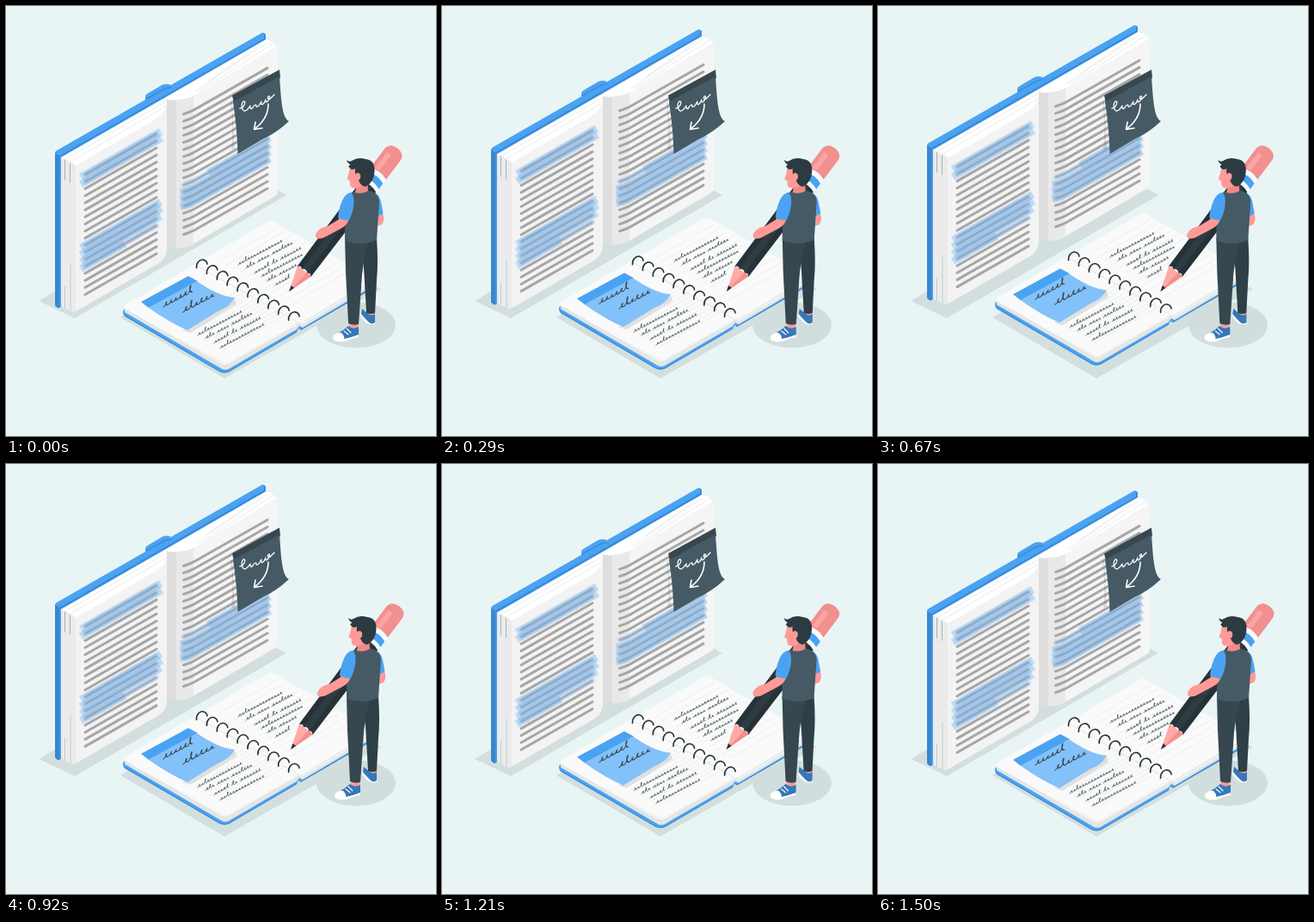
An HTML page that plays this animation: 500x500 px, repeating every 1540 ms.

```html
<!DOCTYPE html>
<html lang="en">
<head>
<meta charset="utf-8">
<title>Taking notes</title>
<style>
html, body { margin: 0; height: 100%; overflow: hidden; background: #e9f5f5; }
svg { display: block; width: 100%; height: 100%; }
path { stroke-linecap: round; stroke-linejoin: round; }
</style>
</head>
<body>
<svg id="stage" viewBox="0 0 500 500"></svg>
<script>
const SLOPE = 0.572;
const BLUE = '#4aa3f2', DEEP = '#3a86cf', DARK = '#263238', SLATE = '#455a64', SKIN = '#ff9a97';

const shape = (d, fill, extra = '') => `<path d="${d}" fill="${fill}" ${extra}/>`;
const stroke = (d, color, width, extra = '') =>
  `<path d="${d}" fill="none" stroke="${color}" stroke-width="${width}" ${extra}/>`;
const range = (n, f) => Array.from({ length: n }, (_, i) => f(i)).join('');
const slant = (x, y, dx) => `M${x} ${y}l${dx} ${-dx * SLOPE}`;

// Printed line, blurred under a marker stroke when highlighted
function printed(d, marker) {
  if (!marker) return stroke(d, '#a6a6a6', 3);
  return stroke(marker, '#4aa3f2', 8.8, 'stroke-opacity=".3" style="stroke-linecap:butt"') +
    `<g style="filter:blur(.9px)">${stroke(d, '#7f9fc2', 3.2)}</g>`;
}

// Cursive scribble rising along the page; words are lengths in letters
function scribble(x, y, words, seed, scale = 1) {
  let d = '', at = 0;
  const random = () => (seed = (seed * 16807) % 2147483647) / 2147483647;
  for (const letters of words) {
    d += `M${at} 0`;
    for (let i = 0; i < letters; i++) {
      const h = random() > 0.85 ? 5 : 1.6 + random() * 1.2;
      d += `c1.4 0 2.800 ${-h} 2.200 ${-h}s-1 ${h} 1.2 ${h}`;
      at += 3.4;
    }
    at += 3.2;
  }
  return `<g transform="translate(${x} ${y}) skewY(-28) scale(${scale})">${stroke(d, '#37474f', 0.7)}</g>`;
}

function book() {
  const left = range(18, i => {
    const y = 196 + 8.2 * i, lit = i < 2 || (i > 9 && i < 14);
    const mark = slant(87, y + 3, i === 13 ? 51 : 93 + i % 2);
    return printed(slant(92, y, 83), lit && mark);
  });
  const right = range(18, i => {
    const y = 72 + 8.24 * i, lit = i > 9 && i < 14;
    const d = `M304 ${y}L218 ${y + 49}q-5 2.500 -11.500 4.500`;
    const mark = i === 10 ? `M307 ${y - 1.5}L235 ${y + 39.5}`
      : `M307 ${y - 1.5}L218 ${y + 49}q-6 3 -15.500 5`;
    return printed(d, lit && mark);
  });
  return shape('M57 171Q57 169 59 168L298 31Q302 31 302 35V200L64 338V350L60 351L57 348Z', BLUE) +
    shape('M162 109V105Q162 103 165 101.500L182 91.500Q187 89.500 192 92L193 95L165 111Z', BLUE) +
    stroke('M163 108L183 97Q188 94 192 95', DEEP, 1.2) +
    shape('M57 171L62.500 174.500V351H60L57 348Z', DEEP) +
    stroke('M63 174.500L301 38V33', DEEP, 1.6) +
    // page block
    shape('M64 176L192 102.500L302 39L309 41L316 48L218 140L187 200L82 190V354L78 356L66 350L64 346Z', '#fff') +
    shape('M64 177L69 178L76 182L82 186V354L78 356L66 350L64 346Z', '#ebebeb') +
    stroke('M68.500 179V202M74.500 183V205', '#8d9699', 0.7) +
    stroke('M68.500 326V351M75 300V354', '#b5bbbd', 0.7) +
    stroke('M69 178L186 111M75 181L187 116M220 99L303 43M236 87L296 45M225 99L310 44', '#dfe3e5', 0.7) +
    // left page
    shape('M81 187Q81 185.500 83 184.500L175 131Q187 124 187 112V282Q187 293 178 299L84 353.500Q81 355 81 352Z', '#f3f3f3') +
    // gutter and right page
    shape('M187 108Q193 111 204 108V281Q196 284 187 279Z', '#dedede') +
    shape('M198 109Q210 109 219 104L314 47Q316 46 316 49V216Q316 219 313 221L219 276Q210 282 198 281Z', '#f5f5f5') +
    shape('M198 109Q210 109 218 104V277Q209 282 198 281Z', '#e9e9e9') +
    left + right;
}

function darkNote() {
  return shape('M263 112L266 166L262 168Q265 140 261 112Z', '#000', 'opacity=".1"') +
    shape('M263 104L318 74L319 84L265 113Z', '#37474f') +
    shape('M264 111.500L318 82C320 110 321 130 329 134Q314 148 298 155L269.500 172Q269 145 264 111.500Z', SLATE) +
    stroke('M272 119C277 118 280 110 276 111C273 113 274 123 278 122Q281 121 284 116Q284 122 287 118Q289 114 291 115Q290 119 294 116L297 111Q296 117 300 113L302 109Q301 114 305 110Q308 104 305 105Q303 109 307 108L312 103', '#fff', 1.3) +
    stroke('M305 114Q305 131 289 143M290 135L288.500 143.500L298 142', '#fff', 1.6);
}

function notebook() {
  const rules = range(12, i =>
    stroke(slant(200 + 4.7 * i, 371 + 2.7 * i, 76), '#e3e6e7', 0.6) +
    stroke(slant(249 + 7.7 * i, 296 + 4.5 * i, 68), '#e3e6e7', 0.6));
  const rings = range(10, i =>
    stroke(`M${221.5 + 11.9 * i} ${304.5 + 6.75 * i}c-.5 -6 4 -10.500 8 -9.500q4 1 4.500 5`, DARK, 1.6));
  return shape('M136 357Q135 354 139 352L308 254L427 321Q429 324 427 328L343 377L340 375L338 379L260 425Q254 428 248 425L138 361Z', BLUE) +
    stroke('M137 359L249 425Q254 427 259 425L338 379M343 376L425 329', DEEP, 1) +
    shape('M138 350V356L251 422Q255 424 259 422L338 376L341 372L345 374L426 326V315Z', '#e4e6e6') +
    shape('M139 352Q136 350 140 347L304 251Q308 248 312 251L425 316L424 320L344 368L338 369L259 414Q255 416 251 414Z', '#fafafa') +
    stroke('M222 302L340 368', '#e4e6e6', 1) +
    stroke('M140 352L251 415.500Q255 417 259 415L338 370M344 370L424 323', '#fff', 1) +
    rules +
    shape('M205 377L214 380L268 347L266 340Z', '#000', 'opacity=".1"') +
    shape('M157 344L212 314L223 320L166 351Z', BLUE) +
    shape('M166 351L222 320Q248 338 266 339Q260 350 246 355L211 377Q190 368 166 351Z', '#82c1f9') +
    scribble(183, 350, [6], 5, 1.65) + scribble(206, 356, [6], 21, 1.75) +
    scribble(223, 383, [15], 11) + scribble(232, 387, [3, 4, 7], 29) +
    scribble(242, 392, [5, 2, 7], 47) + scribble(249, 398, [15], 11) +
    scribble(270, 301, [15], 11) + scribble(279, 305, [3, 4, 7], 29) +
    scribble(289, 311, [5, 2, 7], 47) + scribble(297, 315, [14], 11) +
    scribble(304, 320, [3, 6], 29) + scribble(313, 325, [5], 47) +
    rings;
}

function pencil() {
  return `<g transform="translate(329 332) rotate(-52.9)">` +
    shape('M0 0L30 -10V10Z', '#ffaaa5') + shape('M0 0L30 3V10Z', '#f58f8c') +
    shape('M0 0L7 -2.300V2.300Z', DARK) +
    shape('M29 -10Q33 -7 30 -4Q34 0 30 4Q33 7 29 10L156 11V-11Z', DARK) +
    shape('M30 -4Q34 0 30 4L155 4V-4Z', '#2f3c42') +
    shape('M153 -11.500Q158 0 153 11.500H173Q178 0 173 -11.500Z', '#f5fafc') +
    shape('M158 -11.500Q163 0 158 11.500H166Q171 0 166 -11.500Z', BLUE) +
    shape('M172 -11.500H201Q209 -10 209 0T201 11.500H172Q177 0 172 -11.500Z', '#f28f8f') +
    shape('M175 -7H198V-1H176Z', '#f9a6a2') + '</g>';
}

function writer() {
  const shoe = (d, toe) => shape(d, '#3577b8') + shape(toe, '#fff');
  return pencil() +
    shape('M431 240L438 241Q441 249 437 254L429 257Z', SKIN) +
    shape('M428 217Q434 219 436 228L438.500 241Q435 245 430 244Z', BLUE) +
    // feet
    shape('M420 354H429V362L420 361Z', SKIN) +
    shoe('M414 352L421 358Q426 361 429 358V368Q426 371 422 368L413 358Z', 'M412 357Q414 363 422 368Q426 371 429 368V370Q424 371 420 369Q411 362 412 357Z') +
    shape('M399 366H409V378L399 377Z', SKIN) +
    shoe('M385 381Q393 377 398 372Q403 377 410 373V384Q401 385 395 389L384 388Z', 'M381 383Q385 379 390 380Q394 384 393 387Q400 386 410 382V385Q402 386 397 389Q388 392 382 389Q379 387 381 383Z') +
    stroke('M393 378L398 382M396 375L401 380', '#fff', 1.1) +
    // trousers and shirt
    shape('M412 272L431 270Q433 300 431 318L429 357Q424 359 419 357L416 305Z', '#2f3f47') +
    shape('M394 270L422 273Q416 292 414 312L410 370Q404 372 398 369L395 310Z', '#37474f') +
    shape('M397 219Q406 214 419 214Q433 216 434 227L431 272Q413 280 394 273V248Z', SLATE) +
    // near arm
    shape('M387 243L399 247Q397 255 389 259L374 267Q366 272 361 270Q358 266 363 261Q367 257 374 256L387 248Z', SKIN) +
    shape('M402 217Q395 217 391 226Q387 235 386 246Q392 250 399 249Q406 235 404 222Z', BLUE) +
    // head
    shape('M408 204L420 203L421 215Q415 219 406 217Z', '#f08a87') +
    shape('M400 187Q409 183 415 190V207Q411 213 402 211Q399 209 400 204L396.500 201Q399 195 400 187Z', SKIN) +
    shape('M396 179Q399 182 402 180Q409 175 418 178Q429 179 428.500 192Q428 205 418 210Q413 210 410 203L409 200Q405 196 406 189Q401 192 398 186Q400 186 400 184Q397 183 396 179Z', '#2c3a41') +
    shape('M406 196Q409 192 412 196Q413 202 409 203Q406 201 406 196Z', SKIN);
}

document.getElementById('stage').innerHTML =
  shape('M38 343L80 363L326 220L286 197Z', '#d3dfde') +
  shape('M133 362L254 433L436 329L308 262Z', '#d3dfde') +
  '<ellipse cx="407" cy="371" rx="46" ry="26.500" fill="#d2dedd"/>' +
  `<g class="float">${book()}</g>` + darkNote() +
  `<g class="float">${notebook()}</g><g id="writer">${writer()}</g>`;

const floats = document.querySelectorAll('.float');
const man = document.getElementById('writer');
const SHAKE = [0, -1, 2, -4, 4, -4, 4, -4, 2, -1, 0];

function draw(now) {
  const p = ((now % 1540 + 20) % 1500) / 1500;
  const lift = 10 * (1 - Math.abs(2 * p - 1));
  const i = Math.floor(p * 10);
  const sway = SHAKE[i] + (SHAKE[i + 1] - SHAKE[i]) * (p * 10 - i);
  for (const g of floats) g.setAttribute('transform', `translate(0 ${0.4 - lift})`);
  man.setAttribute('transform', `translate(${0.2 + sway} 0)`);
}

const start = performance.now();
function tick() {
  draw(performance.now() - start);
  requestAnimationFrame(tick);
}
tick();
</script>
</body>
</html>
```
